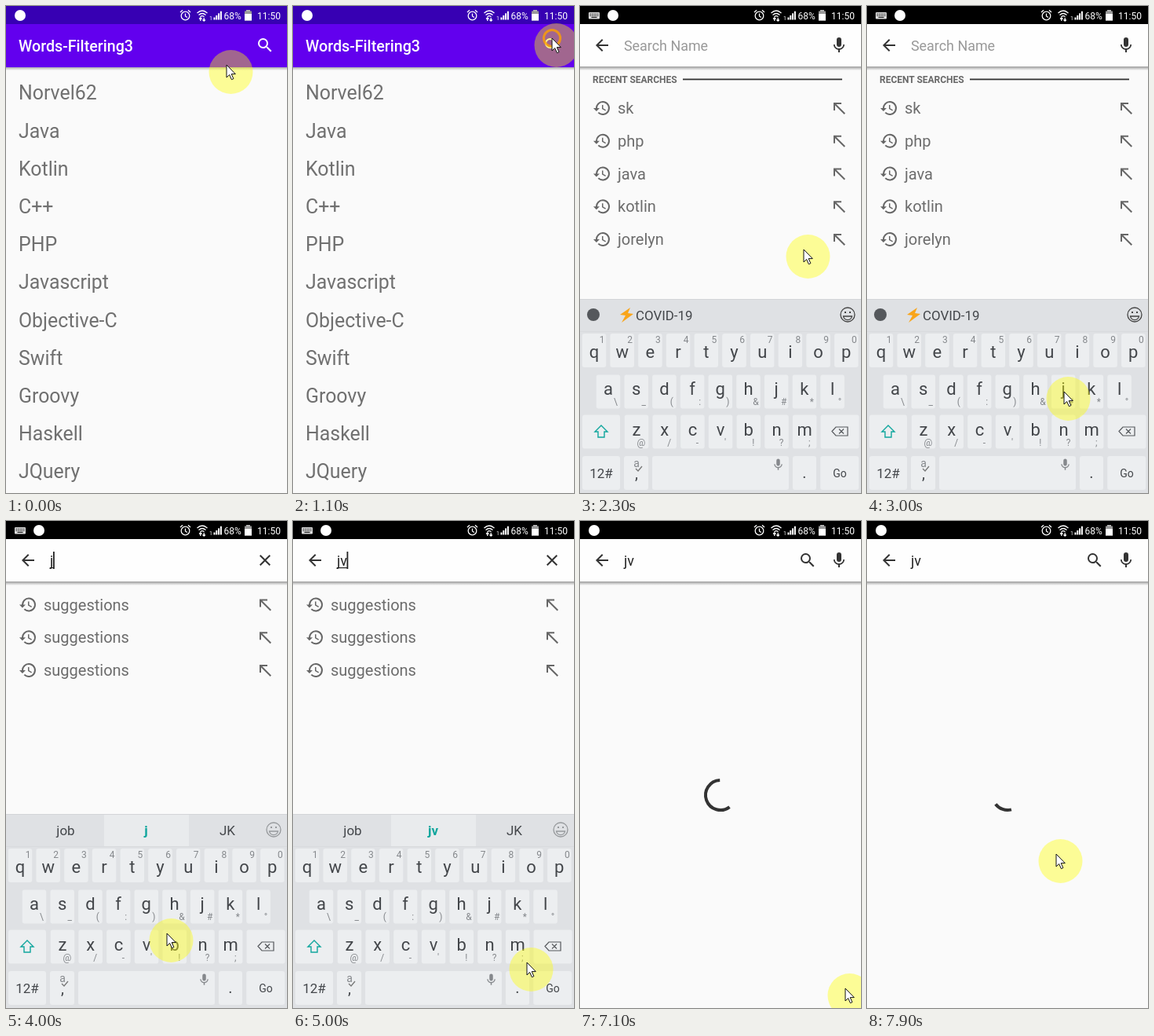
An HTML page for the animation above (8000 ms loop, 358 by 620 pixels).

```html
<!DOCTYPE html>
<html lang="en">
<head>
<meta charset="utf-8">
<title>Words filtering</title>
<style>
html, body { margin: 0; width: 100%; height: 100%; overflow: hidden; background: #fafafa; }
svg { display: block; width: 100vw; height: 100vh; font-family: Roboto, "Noto Sans", sans-serif; }
text { white-space: pre; }
</style>
</head>
<body>
<svg id="stage" viewBox="0 0 358 620" xmlns="http://www.w3.org/2000/svg"></svg>
<script>
const LOOP = 8000, STEP = 100;

const ICON = {
  search: 'M15.5 14h-.79l-.28-.27A6.47 6.47 0 0 0 16 9.5 6.5 6.5 0 1 0 9.5 16c1.61 0 3.09-.59 4.23-1.57l.27.28v.79l5 4.99L20.49 19zM9.5 14a4.5 4.5 0 1 1 0-9 4.5 4.5 0 0 1 0 9z',
  back: 'M20 11H7.83l5.59-5.59L12 4l-8 8 8 8 1.41-1.41L7.83 13H20z',
  mic: 'M12 14a3 3 0 0 0 3-3V5a3 3 0 0 0-6 0v6a3 3 0 0 0 3 3zm5.3-3c0 3-2.54 5.1-5.3 5.1S6.7 14 6.7 11H5c0 3.41 2.72 6.23 6 6.72V21h2v-3.28c3.28-.48 6-3.3 6-6.72z',
  close: 'M19 6.41L17.59 5 12 10.59 6.41 5 5 6.41 10.59 12 5 17.59 6.41 19 12 13.41 17.59 19 19 17.59 13.41 12z',
  history: 'M13 3a9 9 0 0 0-9 9H1l3.89 3.89.07.14L9 12H6a7 7 0 1 1 2.06 4.94l-1.42 1.42A9 9 0 1 0 13 3zm-1 5v5l4.28 2.54.72-1.21-3.5-2.08V8z',
  insert: 'M15 5v2H8.41L20 18.59 18.59 20 7 8.41V15H5V5z'
};

const icon = (name, x, y, fill, id = '', k = 1) =>
  `<path id="${id}" d="${ICON[name]}" fill="${fill}" transform="translate(${x} ${y}) scale(${k})"/>`;
const text = (s, x, y, size, fill, more = '') =>
  `<text x="${x}" y="${y}" font-size="${size}" fill="${fill}" ${more}>${s}</text>`;
const rect = (x, y, w, h, fill, more = '') =>
  `<rect x="${x}" y="${y}" width="${w}" height="${h}" fill="${fill}" ${more}/>`;
const group = (id, body) => `<g id="${id}">${body}</g>`;
const MID = 'text-anchor="middle"';
const shadow = rect(0, 77, 358, 5, 'url(#drop)');

function wordList() {
  const words = ['Norvel62', 'Java', 'Kotlin', 'C++', 'PHP', 'Javascript',
    'Objective-C', 'Swift', 'Groovy', 'Haskell', 'JQuery'];
  return words.map((w, i) => text(w, 16, 119.3 + i * 48.2, 24.9, '#707070')).join('') +
    shadow + rect(0, 0, 358, 78, '#6200ee') + rect(0, 0, 358, 23, '#3700b3') +
    text('Words-Filtering3', 16, 58, 19.7, '#fff', 'font-weight="500"') +
    icon('search', 318, 38, '#fff');
}

const row = (word, y) => icon('history', 16, y - 12, '#666') +
  text(word, 48, y + 7, 20, '#6c6c6c') + icon('insert', 318, y - 12, '#666');
const rows = (list, top) => list.map((w, i) => row(w, top + i * 41.75)).join('');

function searchPage() {
  return rect(0, 23, 358, 660, '#fafafa') +
    group('recent', text('RECENT SEARCHES', 16, 98, 12, '#686868', 'font-weight="700"') +
      rect(131, 92.5, 203, 1.8, '#333') +
      rows(['sk', 'php', 'java', 'kotlin', 'jorelyn'], 130)) +
    group('hints', rows(Array(3).fill('suggestions'), 106.5)) +
    shadow + rect(0, 23, 358, 54, '#fefefe') + icon('back', 16, 38, '#333') +
    text('Search Name', 56, 57, 17.9, '#999', 'id="holder"') +
    text('', 56, 57, 17.9, '#222', 'id="query"') +
    rect(56, 59, 0, 1.2, '#222', 'id="under"') +
    rect(56, 39, 1.8, 22, '#222', 'id="caret"') +
    icon('search', 278, 38, '#333', 'find') + icon('mic', 318, 38, '#333', 'mic') +
    icon('close', 318, 38, '#333', 'clear') +
    '<path id="spin" fill="none" stroke="#333" stroke-width="4"/>';
}

const INK = '#43464a', SOFT = '#85888c', TEAL = '#10a69d';
const KEYS = {};
function key(name, cx, y, w) {
  KEYS[name] = { cx, y, w };
  return rect(cx - w / 2, y, w, 43, '#eceef0', `rx="3" id="key-${name}"`);
}
function letters(chars, marks, x0, y, base, dx, my) {
  return [...chars].map((c, i) => {
    const cx = x0 + i * 35.7;
    return key(c, cx, y, 30.5) + text(c, cx, base, 22, INK, MID) +
      text(marks[i].replace('&', '&amp;'), cx + dx, my, 12, SOFT, MID);
  }).join('');
}

function keyboard() {
  const smile = '<g id="smile" fill="none" stroke="#444" stroke-width="1.3"><circle cx="341" cy="393" r="9"/>' +
    '<path d="M335.5 395a5.6 5.6 0 0 0 11 0z"/><path d="M338 389v2M344 389v2" stroke-width="2"/></g>';
  return rect(0, 373, 358, 320, '#dfe1e4') +
    rect(0, 373, 358, 1, '#d3d5d8') + rect(0, 414, 358, 1, '#d8dadd') +
    group('news', '<circle cx="17" cy="393" r="8" fill="#55585c"/>' +
      '<path d="M64 384l-13 9 7 1-5 9 15-11-7-1z" fill="#f9a51a"/>' +
      text('COVID-19', 71, 399.5, 16.9, INK)) +
    group('picks', rect(125, 374, 108, 40, '#e9ebed') + text('job', 76, 399.5, 17, INK, MID) +
      text('', 178.5, 399.5, 17, TEAL, MID + ' font-weight="700" id="best"') +
      text('JK', 282, 399.5, 17, INK, MID)) + smile +
    letters('qwertyuiop', '1234567890', 18, 417, 448, 10, 428.5) +
    letters('asdfghjkl', '\\_(:)&#*°', 36, 469.5, 495, 9.5, 508) +
    letters('zxcvbnm', "@/-'!?;", 72, 520.5, 547, 6, 560) +
    key('shift', 27, 520.5, 48) + key('del', 331, 520.5, 49) +
    '<path d="M27 534l8 8h-4v7h-8v-7h-4z" fill="none" stroke="' + TEAL + '" stroke-width="1.4"/>' +
    '<path d="M321 541.5l5-5.5h15v11h-15zM330 538.5l6 6m0-6l-6 6" fill="none" stroke="#55585c" stroke-width="1.2"/>' +
    key('num', 27, 573, 48) + text('12#', 27, 601, 17, INK, MID) +
    key('comma', 71.5, 573, 31) + text('a', 72, 587, 14, SOFT, MID) +
    text(',', 72, 602, 20, INK, MID) +
    '<path d="M71 589l3 3 5-6" fill="none" stroke="#777" stroke-width="1.3"/>' +
    key('space', 179, 573, 174) + icon('mic', 243.5, 575, SOFT, '', .75) +
    key('dot', 286, 573, 30) + text('.', 286, 601, 20, INK, MID) +
    key('Go', 330.7, 573, 49) + text('Go', 331, 599.5, 14, INK, MID) +
    group('pop', rect(1, 3, 50, 69, '#000', 'opacity=".35" rx="2"') +
      rect(0, 0, 51, 70, '#f2f3f4', 'rx="2"') + text('', 24.5, 45, 25, INK, MID + ' id="popText"'));
}

function statusBar() {
  const bars = [0, 1, 2, 3].map(i => rect(264.5 + i * 2.8, 14.5 - i * 2.6, 2, 3 + i * 2.6, '#fff')).join('');
  const dots = [0, 1, 2, 3, 4].map(i => rect(12.5 + i * 2.4, 9.5, 1.3, 1.3, '#222') +
    rect(12.5 + i * 2.4, 11.6, 1.3, 1.3, '#222')).join('');
  return rect(0, 0, 358, 23, '#000', 'id="dark"') +
    group('kbd', rect(11, 8, 14, 8.5, '#ddd', 'rx="1"') + dots + rect(14.5, 13.8, 7, 1.2, '#222')) +
    '<circle id="note" cy="12" r="7" fill="#fff"/>' +
    '<g fill="none" stroke="#fff" stroke-width="1.3"><circle cx="228.500" cy="12.500" r="5.3"/>' +
    '<path d="M228.500 9.500v3.500l2.500 1.500M222 8l3-2.800M235 8l-3-2.800"/>' +
    '<path d="M243.500 9q6.500-6 13 0M245.500 11.500q4.500-4 9 0M247.500 13.700q2.500-2 5 0"/>' +
    '<path d="M247.800 19v-4m-1.700 1.500l1.700-1.700 1.700 1.700M252.200 15v4m-1.700-1.500l1.700 1.700 1.700-1.700"/></g>' +
    text('1', 259, 17.5, 7, '#fff') + bars +
    text('68%', 277.5, 16.7, 12, '#fff') +
    rect(306, 5, 5, 2, '#bbb') + rect(304, 6.500, 9, 12, '#999') + rect(304, 10, 9, 8.500, '#fff') +
    text('11:50', 320, 16.700, 12, '#fff');
}

document.getElementById('stage').innerHTML =
  '<defs><linearGradient id="drop" x2="0" y2="1"><stop stop-color="#000" stop-opacity=".38"/>' +
  '<stop offset="1" stop-color="#000" stop-opacity="0"/></linearGradient></defs>' +
  rect(0, 0, 358, 620, '#fafafa') + wordList() + group('page', searchPage()) +
  statusBar() + group('keys', keyboard()) +
  group('mouse', '<circle cx="5.500" cy="9" r="28" fill="#ff0" fill-opacity=".4"/>' +
    '<circle id="ring" fill="none" stroke="#ffa000" stroke-width="3"/>' +
    '<path d="M0 0V16l3.700-3.500 2.700 6.200 2.500-1.100-2.700-6H11.300z" fill="#fff" stroke="#111" stroke-width="1"/>');

const $ = id => document.getElementById(id);
const set = (id, attrs) => { for (const a in attrs) $(id).setAttribute(a, attrs[a]); };
const show = (id, on) => set(id, { visibility: on ? 'visible' : 'hidden' });
const clamp = v => Math.max(0, Math.min(1, v));
const ramp = (t, a, b) => clamp((t - a) / (b - a));
const ease = v => { v = clamp(v); return v * v * (3 - 2 * v); };
const slow = v => 1 - (1 - v) ** 2;

// time, x, y of the pointer tip
const PATH = [
  [0, 281, 75], [200, 296, 65], [600, 330, 41], [2000, 330, 41], [2300, 285, 310],
  [2500, 256, 470], [2700, 251, 491], [3700, 251, 491], [4000, 205, 525], [4200, 178, 539],
  [4600, 178, 539], [4800, 240, 549], [5000, 298, 562], [5200, 308, 572], [5600, 338, 595],
  [7100, 338, 595], [7400, 300, 525], [7800, 241, 424], [8000, 241, 424]
];
const CLICKS = [1000, 3500, 4500, 6400];
const PRESSES = [['j', 3500], ['v', 4500], ['Go', 6400]];
const TYPED = [[3600, 'j', 4.5], [4600, 'jv', 13]];
const SENT = 6400, LOAD = 6700;

function pointer(t) {
  const i = PATH.findIndex(p => p[0] > t);
  const [t0, x0, y0] = PATH[i - 1], [t1, x1, y1] = PATH[i];
  const k = (t - t0) / (t1 - t0);
  set('mouse', { transform: `translate(${x0 + (x1 - x0) * k} ${y0 + (y1 - y0) * k})` });
  const hit = CLICKS.find(c => t >= c && t < c + 300);
  show('ring', hit !== undefined);
  if (hit !== undefined) set('ring', { r: 7 + (t - hit) * .035, opacity: 1 - (t - hit) / 500 });
}

function field(t) {
  const [since, word, width] = TYPED.filter(s => t >= s[0]).pop() || [2500, '', 0];
  const sent = t >= SENT;
  $('query').textContent = $('best').textContent = word;
  show('holder', !word);
  show('recent', !word);
  show('hints', word && !sent);
  set('under', { width: sent ? 0 : width });
  set('caret', { x: 55.5 + width });
  show('caret', t >= since && !sent && (t - since) % 1000 < 500);
  show('find', sent);
  show('mic', !word || sent);
  show('clear', word && !sent);
  show('news', !word);
  show('picks', word);
  set('smile', { stroke: word ? '#96999c' : '#444' });
}

function keysAt(t) {
  const up = slow(ramp(t, 1900, 2300)), down = ramp(t, 6500, 6800);
  set('keys', { transform: `translate(0 ${(1 - up + down * down) * 60})`, opacity: up * (1 - down) });
  const open = t >= 2100 && t < 6700;
  show('kbd', open);
  set('note', { cx: open ? 42 : 18 });
  let live = false;
  for (const [name, at] of PRESSES) {
    const on = t >= at && t < at + 200, k = KEYS[name];
    set('key-' + name, { fill: on ? '#909398' : '#eceef0' });
    if (!on) continue;
    live = true;
    $('popText').textContent = name;
    set('pop', { transform: `translate(${Math.min(303, k.cx - 25.5)} ${k.y - 82})` });
  }
  $('pop').style.display = live ? '' : 'none';
}

function spinner(t) {
  show('spin', t >= LOAD);
  const age = Math.max(0, t - LOAD), u = age / 1333 % 1;
  const tail = -17.6 + .108 * age + 90 * u + 270 * ease(2 * u - 1);
  const head = tail + 40 + 270 * (ease(2 * u) - ease(2 * u - 1));
  const at = d => `${179 + 19 * Math.cos(d * Math.PI / 180)} ${349 + 19 * Math.sin(d * Math.PI / 180)}`;
  set('spin', { d: `M${at(tail)}A19 19 0 ${head - tail > 180 ? 1 : 0} 1 ${at(head)}` });
}

function draw(t) {
  const fade = ramp(t, 1200, 1400);
  set('page', { opacity: fade, transform: `translate(0 ${50 * (1 - slow(ramp(t, 1200, 1550)))})` });
  set('dark', { opacity: fade });
  pointer(t);
  field(t);
  keysAt(t);
  spinner(t);
}

const start = performance.now();
function tick() {
  const t = (performance.now() - start) % LOOP;
  draw(Math.floor(t / STEP) * STEP);
  requestAnimationFrame(tick);
}
tick();
</script>
</body>
</html>
```
